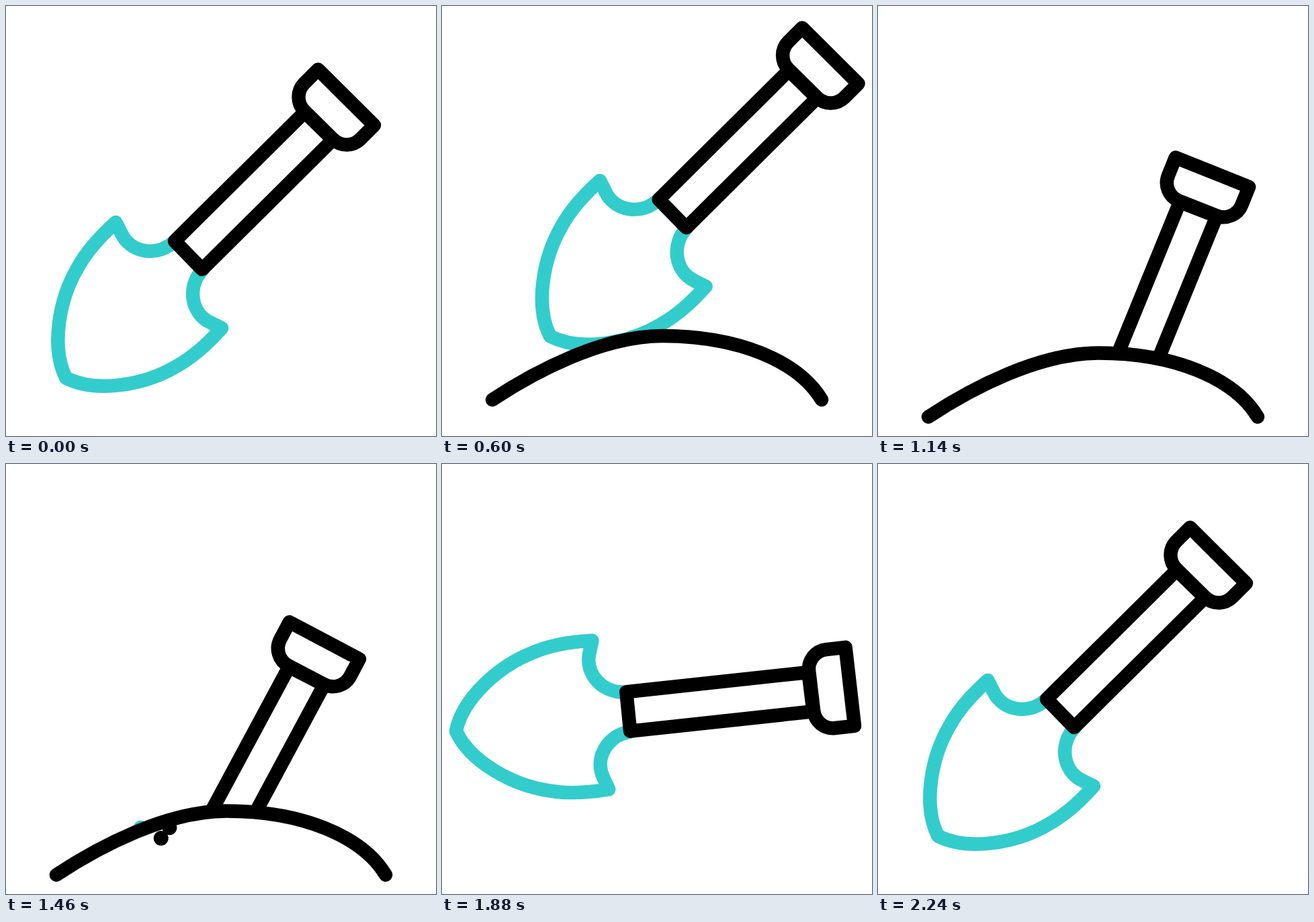
An HTML page for the animation above (2.4 s loop, 640 by 640 pixels).

```html
<!DOCTYPE html>
<html lang="en">
<head>
<meta charset="utf-8">
<title>Digging shovel</title>
<style>
  html, body { margin: 0; width: 100%; height: 100%; overflow: hidden; background: #fff; }
  svg { display: block; width: 100vw; height: 100vh; }
  .line { fill: none; stroke: #000; stroke-width: 20.5; stroke-linecap: round; stroke-linejoin: round; }
  .teal { stroke: #33cccc; }
</style>
</head>
<body>
<svg viewBox="0 0 640 640">
  <defs>
    <path id="half" d="M251 350C226 374 186 368 172 339L163.5 322C140 343 119 367 107 389C78 438 67 509 89 553"/>
    <path id="hill" pathLength="1" d="M75 586C140 543 240 491 328 491C440 491 530 528 565 586"/>
  </defs>
  <g id="shovel">
    <g class="line teal">
      <use href="#half"/>
      <use href="#half" transform="matrix(0 -1 -1 0 643 643)"/>
    </g>
    <path class="line" d="M444.5 158L251 350L292 392L486.5 199Z"/>
    <path class="line" d="M464.5 94.5L548 177.5L527.5 198A29 29 0 0 1 486.5 198L444 156A29 29 0 0 1 444 115Z"/>
  </g>
  <g id="mound">
    <g id="soil" fill="#fff">
      <use href="#hill"/>
      <rect x="75" y="585" width="490" height="300"/>
    </g>
    <use id="ridge" class="line" href="#hill"/>
  </g>
  <circle class="clod" r="11"/>
  <circle class="clod" r="11"/>
</svg>
<script>
  const LOOP = 2400;
  const $ = id => document.getElementById(id);
  const clods = document.querySelectorAll('.clod');

  const show = (el, on) => { el.style.display = on ? '' : 'none'; };
  const bow = u => u * (1 - u);

  // Smooth rise from 0 to 1 between two times
  function ramp(t, from, to) {
    const s = Math.min(1, Math.max(0, (t - from) / (to - from)));
    return s * s * (3 - 2 * s);
  }

  function moveShovel(t) {
    const lift = ramp(t, 0, 560);
    const dig = ramp(t, 560, 868);
    const tilt = ramp(t, 600, 900);
    const push = ramp(t, 868, 1400);
    const scoop = ramp(t, 1400, 1740);
    const home = ramp(t, 1740, 2240);

    const x = 69 * lift - 36 * bow(lift) + 53 * dig - 92.9 * push + 17 * bow(push) + 4.3 * scoop - 33.4 * home;
    const y = -73 * lift - 32 * bow(lift) + 226 * dig + 31.7 * push - 136.5 * scoop - 48.2 * home;
    const angle = -23 * tilt + 70.9 * scoop - 47.9 * home;
    $('shovel').setAttribute('transform', `translate(${x} ${y}) rotate(${angle} 320 320)`);
  }

  function moveMound(t) {
    const drawn = ramp(t, 0, 560);
    const sink = 25.5 * ramp(t, 820, 1080) + 155 * ramp(t, 1460, 1740);
    $('mound').setAttribute('transform', `translate(0 ${sink})`);
    $('ridge').style.strokeDasharray = drawn < 1 ? `${drawn} 2` : 'none';
    show($('mound'), drawn > 0.003 && t < 1740);
    show($('soil'), drawn === 1);
  }

  function tossClods(t) {
    const s = (t - 1460) / 1000;
    clods.forEach((clod, i) => {
      clod.setAttribute('cx', 231 + 12.5 * i + (180 * i - 300) * s);
      clod.setAttribute('cy', 558 - 15.5 * i - (1100 + 150 * i) * s + (4500 + 500 * i) * s * s);
      show(clod, t >= 1440 && t < 1800);
    });
  }

  function render(t) {
    moveShovel(t);
    moveMound(t);
    tossClods(t);
  }

  const start = performance.now();
  function tick() {
    render((performance.now() - start) % LOOP);
    requestAnimationFrame(tick);
  }
  render(0);
  requestAnimationFrame(tick);
</script>
</body>
</html>
```
